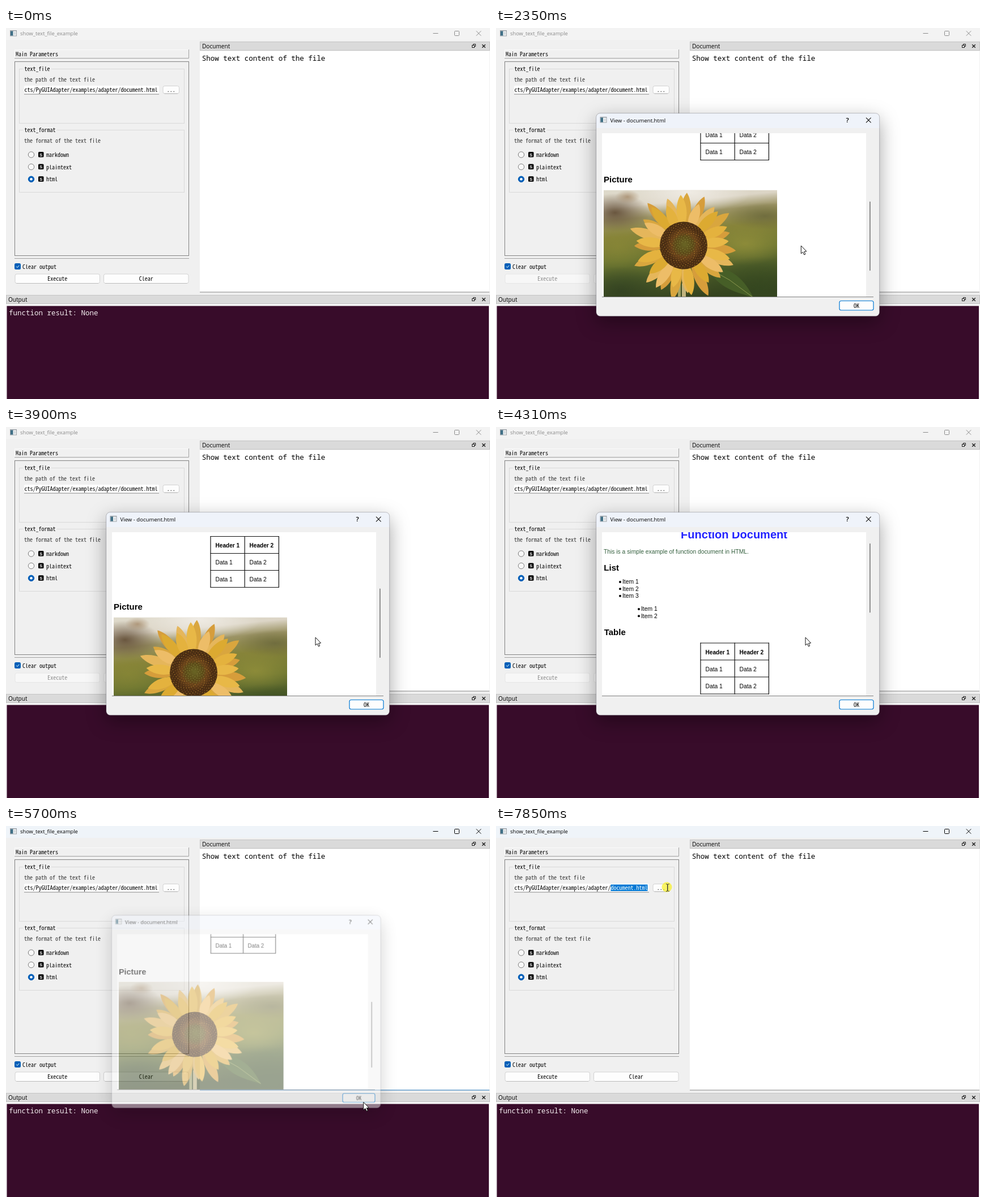
Animation of 854x656 px, one loop 8000 ms. Source, as an HTML page with a canvas:

```html
<!DOCTYPE html>
<html lang="en">
<head>
<meta charset="utf-8">
<title>show_text_file_example</title>
<style>
html, body { margin: 0; width: 100%; height: 100%; overflow: hidden; background: #f0f0f0; }
canvas { display: block; }
</style>
</head>
<body>
<canvas id="stage" width="854" height="656"></canvas>
<script>
const W = 854, H = 656, LOOP = 8000;
const stage = document.getElementById('stage').getContext('2d');
const layer = document.createElement('canvas');
layer.width = W;
layer.height = H;
const layerCtx = layer.getContext('2d');
let c = stage;

const UI = '"Open Sans", "Noto Sans", sans-serif';
const FORM = '10px "Noto Sans Mono CJK SC", "Noto Sans Mono CJK JP", "Liberation Mono", monospace';
const CODE = '12.5px "Noto Sans Mono", "DejaVu Sans Mono", monospace';
const DOC = '"Liberation Sans", Arial, sans-serif';
const BLUE = '#005fb8';

// Times of the main events
const PRESS = 740, RUN = 1300, OPEN = 1460, SHUT = 5600, SELECT = 7250;

// time, x, y of the pointer tip
const POINTER = [
  [70, 330, 628], [600, 118.5, 450.5], [1560, 118.5, 450.5], [2070, 470, 500],
  [2420, 546, 372], [4960, 546, 372], [5180, 602, 530], [5400, 632, 489],
  [5680, 632, 489], [6260, 312.5, 290], [6900, 203, 109], [SELECT, 203, 109], [7800, 303, 109]
];
// time and offset after each wheel notch
const SCROLL = [
  [0, 0], [2140, 62.5], [2210, 125], [2280, 187.5], [2350, 250], [2690, 312.5], [2760, 324],
  [3290, 261.5], [3350, 199], [3570, 136.5], [3770, 200], [3970, 136.5], [4110, 74],
  [4250, 11.5], [4520, 74], [4730, 136.5], [4800, 199], [4940, 262]
];
const CLICKS = [[PRESS, 860], [5480, 5600], [SELECT, LOOP]];

const clamp = (v, a = 0, b = 1) => Math.min(b, Math.max(a, v));
const within = (t, a, b) => t >= a && t < b;
const scrollAt = t => SCROLL.filter(s => s[0] <= t).pop()[1];

function pointerAt(t) {
  const i = POINTER.findIndex(p => p[0] > t);
  if (i < 0) return POINTER[POINTER.length - 1].slice(1);
  const [t0, x0, y0] = POINTER[i - 1], [t1, x1, y1] = POINTER[i];
  const u = (t - t0) / (t1 - t0), k = u * u * (3 - 2 * u);
  return [x0 + (x1 - x0) * k, y0 + (y1 - y0) * k];
}

function rect(x, y, w, h, fill) {
  c.fillStyle = fill;
  c.fillRect(x, y, w, h);
}

function round(x, y, w, h, r, fill, stroke, width = 1) {
  c.beginPath();
  c.roundRect(x, y, w, h, r);
  if (fill) { c.fillStyle = fill; c.fill(); }
  if (stroke) { c.strokeStyle = stroke; c.lineWidth = width; c.stroke(); }
}

function disc(x, y, r, fill, stroke) {
  c.beginPath();
  c.arc(x, y, r, 0, Math.PI * 2);
  if (fill) { c.fillStyle = fill; c.fill(); }
  if (stroke) { c.strokeStyle = stroke; c.lineWidth = 1; c.stroke(); }
}

function line(points, color, width = 1) {
  c.beginPath();
  points.forEach(([x, y], i) => i ? c.lineTo(x, y) : c.moveTo(x, y));
  c.strokeStyle = color;
  c.lineWidth = width;
  c.stroke();
}

function text(s, x, y, font, color = '#000', align = 'left') {
  c.font = font;
  c.fillStyle = color;
  c.textAlign = align;
  c.fillText(s, x, y);
}

const form = (s, x, y, color, align) => text(s, x, y, FORM, color, align);

function cross(x, y, r, color, width) {
  line([[x - r, y - r], [x + r, y + r]], color, width);
  line([[x + r, y - r], [x - r, y + r]], color, width);
}

function windowIcon(x, y) {
  rect(x, y, 12, 10.5, '#9a9fa5');
  rect(x + 1, y + 1.5, 10, 8, '#f6f7f8');
  rect(x + 1, y + 1.5, 4.5, 8, '#3f6f86');
  rect(x + 7, y + 3, 3, 5, '#d5d9dc');
}

function button(label, x, y, w, h, enabled = true, hover = false) {
  round(x + .5, y + .5, w - 1, h - 1, 3, !enabled ? '#f7f7f7' : hover ? '#f9f9f9' : '#fdfdfd', enabled ? '#d2d2d2' : '#e6e6e6');
  if (enabled) line([[x + 3, y + h - .5], [x + w - 3, y + h - .5]], '#bcbcbc');
  form(label, x + w / 2, y + h / 2 + 3.7, enabled ? '#000' : '#8c8c8c', 'center');
}

function dockBar(label, x, y, w) {
  rect(x, y, w, 16, '#dadada');
  c.strokeStyle = '#c4c4c4';
  c.lineWidth = 1;
  c.strokeRect(x + .5, y + .5, w - 1, 15);
  text(label, x + 4, y + 12, '10.1px ' + UI);
  const bx = 822.5, by = y + 6.5;
  c.strokeStyle = '#222';
  c.strokeRect(bx, by, 4, 4);
  line([[bx + 2, by], [bx + 2, by - 2], [bx + 6, by - 2], [bx + 6, by + 2], [bx + 4, by + 2]], '#222');
  cross(843, y + 8, 2.8, '#222', 1.4);
}

function group(label, y, h) {
  c.strokeStyle = '#dadada';
  c.lineWidth = 1;
  c.strokeRect(23.5, y + .5, 291, h);
  rect(30, y - 3, label.length * 5 + 5, 8, '#f0f0f0');
  form(label, 32.5, y + 3.5);
}

function option(label, y, checked) {
  disc(44.5, y, 5.2, checked ? BLUE : '#f8f8f8', checked ? BLUE : '#7c7c7c');
  if (checked) disc(44.5, y, 2.3, '#fff');
  round(57, y - 5, 9.5, 9.5, 1.5, '#000');
  text('S', 61.8, y + 2.7, 'bold 7.5px ' + DOC, '#fff', 'center');
  form(label, 71, y + 4);
}

function pathField(selected) {
  const path = 'cts/PyGUIAdapter/examples/adapter/document.html', from = 34;
  round(32, 102, 238, 15, 2, '#fff');
  line([[32, 117], [270, 117]], '#868686');
  form(path, 32.5, 113);
  if (selected > 0) {
    const x = 32.5 + from * 5;
    rect(x, 103.5, selected * 5, 11.5, '#0078d4');
    form(path.slice(from, from + selected), x, 113, '#fff');
  }
}

function mainWindow(t, px) {
  const busy = within(t, RUN, SHUT + 60);
  const active = within(t, PRESS, RUN) || t >= SHUT + 60;
  const ink = active ? '#000' : '#8b8b8b';
  rect(0, 0, W, H, '#f0f0f0');
  rect(0, 0, W, 21, active ? '#eff4f9' : '#f3f3f3');
  windowIcon(7, 4);
  text('show_text_file_example', 25, 13.3, '9.3px ' + UI, ink);
  line([[753.5, 9.5], [762.5, 9.5]], ink);
  round(791.5, 5.5, 8, 8, 1, null, ink);
  cross(834, 9.5, 4.2, ink, 1);

  line([[15, 53.5], [322.5, 53.5], [322.5, 38]], '#a0a0a0');
  line([[15.5, 53], [15.5, 38.5], [322, 38.5]], '#fbfbfb');
  form('Main Parameters', 17, 49.5);
  c.strokeStyle = '#828282';
  c.strokeRect(15.5, 59.5, 307, 343);

  group('text_file', 72, 96);
  form('the path of the text file', 32, 94.5, '#333');
  pathField(t >= SELECT ? clamp(Math.round((px - 202.5) / 5), 0, 13) : 0);
  button('...', 276.5, 102, 29.5, 14.5);
  group('text_format', 180, 110);
  form('the format of the text file', 32, 202.5, '#333');
  option('markdown', 224, false);
  option('plaintext', 245.5, false);
  option('html', 267.3, true);

  line([[15, 407.5], [323, 407.5]], '#a0a0a0');
  round(15, 416, 11, 11, 2.5, BLUE);
  line([[18, 421.5], [20, 423.5], [23.3, 419.8]], '#fff');
  form('Clear output', 29, 425.5);
  button('Execute', 15.5, 434.5, 150.5, 17.5, !busy, within(t, 500, 890));
  button('Clear', 172, 434.5, 150.5, 17.5, !busy);

  dockBar('Document', 342, 24, 512);
  rect(342, 41, 511, 426, '#fff');
  line([[342, 467], [853, 467]], within(t, SHUT + 60, SELECT) ? '#1a6fb5' : '#868686', 1);
  text('Show text content of the file', 345.8, 58, CODE);
  dockBar('Output', 0, 472, 854);
  rect(0, 488, W, 168, '#f8f8f8');
  rect(1.5, 491.5, 850.5, 165, '#380c2a');
  if (!busy) text('function result: None', 5, 508, CODE, '#f3ecef');
}

function petals(n, length, width, turn, colors) {
  for (let i = 0; i < n; i++) {
    const len = length * (1 + .08 * Math.sin(i * 2.7 + turn));
    c.save();
    c.rotate(turn + i * Math.PI * 2 / n + .06 * Math.sin(i * 5.1));
    c.beginPath();
    c.moveTo(30, 0);
    c.bezierCurveTo(len * .55, -width, len * .85, -width * .8, len, 0);
    c.bezierCurveTo(len * .85, width * .8, len * .55, width, 30, 0);
    c.fillStyle = colors[i % colors.length];
    c.fill();
    c.restore();
  }
}

function blot(x, y, rx, ry, color) {
  c.save();
  c.translate(x, y);
  c.scale(rx, ry);
  const g = c.createRadialGradient(0, 0, 0, 0, 0, 1);
  g.addColorStop(0, color);
  g.addColorStop(1, color.slice(0, 7) + '00');
  c.fillStyle = g;
  c.fillRect(-1, -1, 2, 2);
  c.restore();
}

function photo(x, y) {
  c.save();
  c.translate(x, y);
  c.beginPath();
  c.rect(0, 0, 306, 203);
  c.clip();
  const g = c.createLinearGradient(0, 0, 20, 203);
  [[0, '#dedacb'], [.16, '#dcd5c6'], [.27, '#9b9364'], [.42, '#858239'], [.62, '#6d7631'], [.8, '#4b5b28'], [1, '#35431f']]
    .forEach(([p, k]) => g.addColorStop(p, k));
  rect(0, 0, 306, 203, g);
  blot(150, 4, 110, 36, '#efebe4ff');
  blot(20, 40, 62, 34, '#645039f0');
  blot(42, 12, 22, 12, '#a48867c0');
  blot(285, 46, 70, 24, '#6c693ddd');
  blot(250, 95, 75, 38, '#98933cb0');
  blot(25, 100, 60, 40, '#8b8936a0');
  blot(275, 172, 95, 55, '#34471fd0');
  blot(30, 180, 75, 45, '#314021d0');
  rect(131, 165, 5, 38, '#a0a267');
  rect(138, 165, 7, 38, '#c0b37e');
  c.beginPath();
  c.moveTo(180, 136);
  c.bezierCurveTo(215, 132, 245, 150, 264, 190);
  c.bezierCurveTo(235, 180, 207, 178, 180, 136);
  c.fillStyle = '#465e27';
  c.fill();
  line([[186, 139], [222, 159], [264, 190]], '#8b984e');
  c.translate(141, 98);
  petals(19, 92, 13, .1, ['#d69d3b', '#e5b65b', '#d9a63e']);
  petals(17, 83, 13, .28, ['#e8b847', '#edbd68', '#dcaa31', '#e4b23e']);
  const core = c.createRadialGradient(2, -2, 2, 0, 0, 43);
  [[0, '#686223'], [.3, '#5c4c19'], [.5, '#69431a'], [.75, '#4a2d13'], [1, '#4b3013']].forEach(([p, k]) => core.addColorStop(p, k));
  disc(0, 0, 42, core);
  for (let i = 6; i < 320; i++) {
    const r = 2.4 * Math.sqrt(i), a = i * 2.39996;
    disc(r * Math.cos(a), r * Math.sin(a) * .94, .75, i < 70 ? '#87853a' : i % 3 ? '#8c5b25' : '#b9842f');
  }
  c.restore();
}

function bullet(label, x, y) {
  disc(x - 4, y - 3.5, 2, '#000');
  text(label, x, y, '10.3px ' + DOC);
}

function page(scroll) {
  const h2 = 'bold 15px ' + DOC, body = '10.3px ' + DOC;
  c.save();
  c.beginPath();
  c.rect(187, 186, 466, 289);
  c.clip();
  rect(187, 186, 466, 289, '#fff');
  c.translate(0, -scroll);
  text('Function Document', 420, 208.5, 'bold 20px ' + DOC, '#2222ff', 'center');
  text('This is a simple example of function document in HTML.', 190, 235.5, body, '#35603f');
  text('List', 190.3, 265.5, h2);
  [1, 2, 3].forEach(n => bullet('Item ' + n, 223, 276.5 + n * 12.4));
  [1, 2].forEach(n => bullet('Item ' + n, 256, 324.5 + n * 12.4));
  text('Table', 190.7, 379, h2);
  for (let i = 0; i < 4; i++) {
    const y = 393.5 + i * 30;
    line([[360.5, y], [482, y]], '#111', 1.2);
    if (i === 3) break;
    line([[361 + i * 60.2, 393], [361 + i * 60.2, 484]], '#111', 1.2);
    [1, 2].forEach(n => text((i ? 'Data ' : 'Header ') + n, 309.5 + n * 60, y + 19.7, i ? body : 'bold 10.1px ' + DOC));
  }
  text('Picture', 190, 522.5, h2);
  photo(190, 536.5);
  text('Link', 190, 769, h2);
  text('Link', 190, 793.5, 'bold 10px ' + DOC, '#d0590f');
  line([[190, 795], [210, 795]], '#d0590f');
  c.restore();
}

function dialog(t) {
  const scroll = scrollAt(t);
  c.save();
  c.shadowColor = 'rgba(0,0,0,.36)';
  c.shadowBlur = 34;
  c.shadowOffsetY = 11;
  round(177, 151, 499.5, 358.5, 7, '#f0f0f0');
  c.restore();
  c.save();
  c.beginPath();
  c.roundRect(177, 151, 499.5, 358.5, 7);
  c.clip();
  rect(177, 151, 500, 26, '#eff3fa');
  c.restore();
  round(176.7, 150.7, 500, 359, 7, null, 'rgba(110,110,120,.5)', .8);
  windowIcon(183.5, 157);
  text('View - document.html', 201.5, 166.8, '9.6px ' + UI);
  text('?', 620, 167, '600 11.5px ' + UI, '#000', 'center');
  cross(657.3, 163, 4.3, '#111', 1.1);
  page(scroll);
  round(659, 201 + scroll * 137 / 324, 1.8, 122.5, 1, '#858585');
  line([[187, 475.5], [666, 475.5]], '#808080');
  round(606, 482.5, 60, 16.5, 3, '#fdfdfd', '#0078d4', 1.2);
  form('OK', 636, 494.7, '#000', 'center');
}

function dialogLayer(t) {
  const q = t < 3000 ? clamp((t - OPEN) / 220) : 1 - clamp((t - SHUT) / 200);
  if (q <= 0) return;
  if (q === 1) { dialog(t); return; }
  c = layerCtx;
  c.clearRect(0, 0, W, H);
  dialog(t);
  c = stage;
  const s = .9 + .1 * q, off = 1 - s;
  c.save();
  c.globalAlpha = t < 3000 ? clamp(q * 3.2) : q;
  c.translate(427 - 58 * off, 330.5 - 38 * off);
  c.scale(s, s);
  c.drawImage(layer, -427, -330.5);
  c.restore();
}

function pointer(t, x, y) {
  if (CLICKS.some(([a, b]) => within(t, a, b))) disc(x - 1.5, y - 1, 9, 'rgba(246,240,40,.72)');
  if (t > 6500 && x < 310 && within(y, 100, 118)) {
    line([[x - 3, y - 6.5], [x - .5, y - 6], [x - .5, y + 6], [x - 3, y + 6.5]], '#333');
    line([[x + 3, y - 6.5], [x, y - 6], [x, y + 6], [x + 3, y + 6.5]], '#333', .8);
    return;
  }
  c.beginPath();
  [[0, 0], [0, 14], [3.2, 11.2], [5.4, 16], [7.6, 15], [5.5, 10.4], [9.6, 10]].forEach(([dx, dy]) => c.lineTo(x + dx, y + dy));
  c.closePath();
  c.fillStyle = '#fff';
  c.fill();
  c.strokeStyle = '#111';
  c.lineWidth = 1;
  c.stroke();
}

function draw(now) {
  const t = now % LOOP;
  const [x, y] = t < POINTER[0][0] ? [0, 0] : pointerAt(t);
  mainWindow(t, x);
  dialogLayer(t);
  if (t >= POINTER[0][0]) pointer(t, x, y);
}

const start = performance.now();
function tick() {
  draw(performance.now() - start);
  requestAnimationFrame(tick);
}
tick();
</script>
</body>
</html>
```
